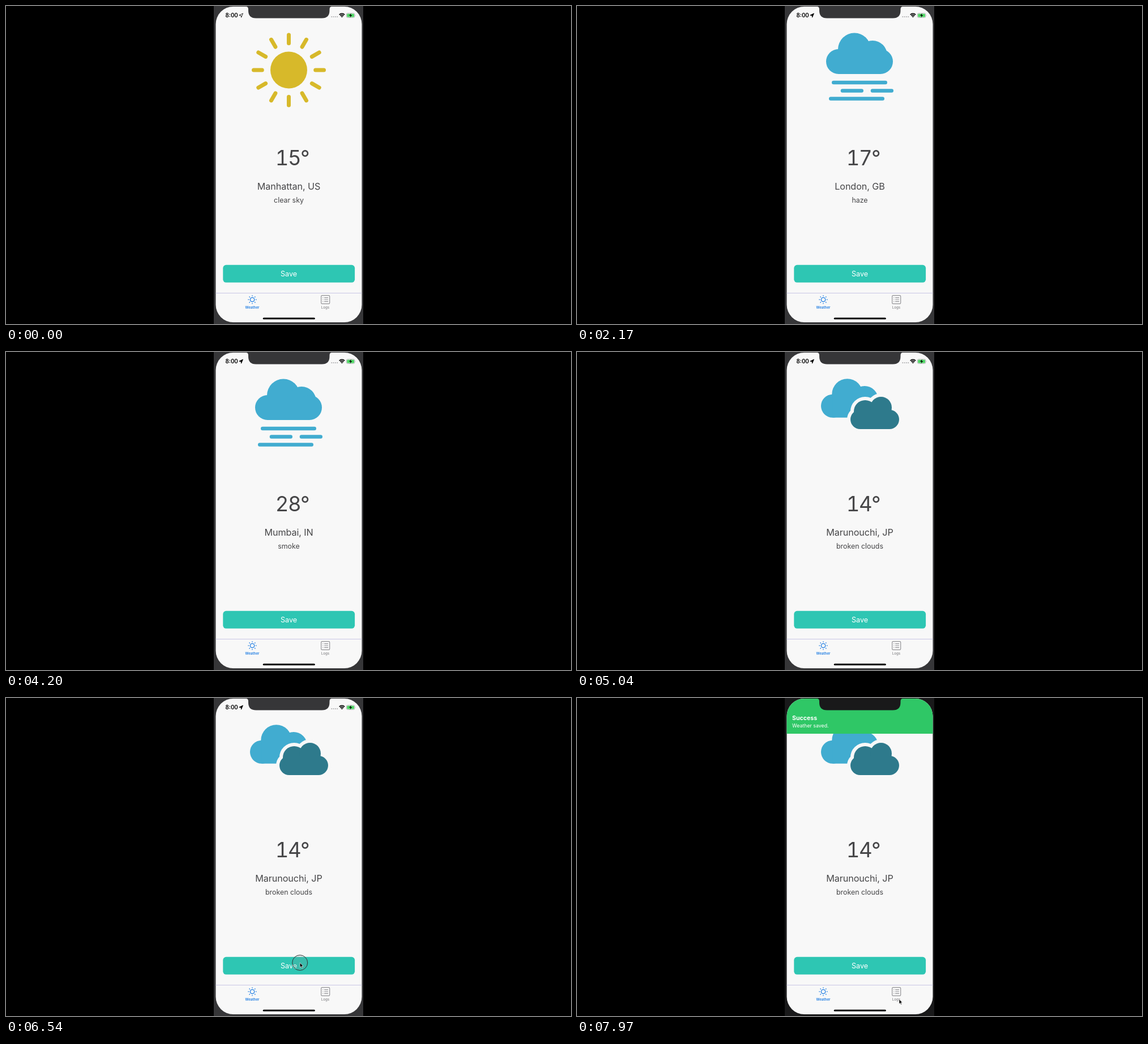
Animation of 998 by 561 pixels, one loop 8000 ms. Source, as an HTML page:

```html
<!DOCTYPE html>
<html lang="en">
<head>
<meta charset="utf-8">
<title>Weather</title>
<style>
  html, body { margin: 0; width: 100%; height: 100%; overflow: hidden; background: #000; }
  svg { display: block; width: 100%; height: 100%; font-family: Inter, "Open Sans", sans-serif; }
  .center { text-anchor: middle; }
  .ink { fill: #464648; }
  #temperature { font-size: 36.5px; letter-spacing: -1.6px; text-anchor: end; font-feature-settings: "tnum"; }
  #city { font-size: 16.2px; letter-spacing: -.1px; }
  #sky { font-size: 12.4px; }
  .tab { font-size: 6.1px; font-weight: 600; text-anchor: middle; }
  .round { fill: none; stroke-linecap: round; }
</style>
</head>
<body>
<svg viewBox="0 0 998 561">
  <defs>
    <clipPath id="screen"><rect x="370.5" y="1" width="258" height="557" rx="31"/></clipPath>
    <g id="bigCloud">
      <circle cx="462" cy="98" r="22"/><circle cx="490" cy="76.5" r="29"/>
      <circle cx="522" cy="87" r="26"/><circle cx="536" cy="98" r="22"/>
      <rect x="462" y="80" width="74" height="40"/>
    </g>
    <g id="darkCloud">
      <circle cx="500" cy="119" r="17"/><circle cx="509" cy="105" r="20"/>
      <circle cx="537" cy="98" r="19"/><circle cx="552" cy="119" r="17"/>
      <rect x="500" y="105" width="52" height="31"/>
    </g>
  </defs>

  <rect id="bezel" x="367" width="264" height="561"/>
  <g clip-path="url(#screen)">
    <rect x="370" width="260" height="560" fill="#f8f8f8"/>

    <g id="sun" fill="#d7b92a" stroke="#d7b92a">
      <circle cx="499.5" cy="113" r="32.5" stroke="none"/>
      <g id="sunRays" class="round" stroke-width="7"/>
    </g>
    <g id="haze" fill="#41acd0">
      <use href="#bigCloud"/>
      <path class="round" stroke="#41acd0" stroke-width="6.6"
        d="M453.3 135H544.7M469 149.5H502.7M522 149.5H555.7M448.3 163.5H539.7"/>
    </g>
    <g id="clouds">
      <g fill="#41acd0">
        <circle cx="451.5" cy="95.2" r="20.5"/><circle cx="477.5" cy="74.5" r="27.2"/>
        <circle cx="508" cy="84" r="24"/><rect x="451.5" y="78" width="60" height="37.7"/>
      </g>
      <use href="#darkCloud" fill="#f8f8f8" stroke="#f8f8f8" stroke-width="12"/>
      <use href="#darkCloud" fill="#2e7a8c"/>
    </g>

    <text id="temperature" class="ink" x="535" y="280.5"></text>
    <text id="city" class="ink center" x="499.5" y="324"></text>
    <text id="sky" class="ink center" x="499.5" y="347.3"></text>

    <rect x="383.3" y="456.8" width="232.8" height="31" rx="5.5" fill="#2ec6b3"/>
    <text class="center" x="499.5" y="477" font-size="12.6" fill="#fff">Save</text>

    <rect x="370" y="506" width="260" height="1" fill="#c9c7e6"/>
    <g fill="#1c7be2">
      <circle class="round" cx="435" cy="518" r="3.7" stroke="#1c7be2" stroke-width="1.3"/>
      <g id="tabRays" class="round" stroke="#1c7be2" stroke-width="1.4"/>
      <text class="tab" x="435" y="534.3">Weather</text>
    </g>
    <g fill="#949497">
      <rect class="round" x="556.7" y="510.6" width="15" height="14.8" rx="1.7" stroke="#949497" stroke-width="1.2"/>
      <path class="round" stroke="#949497" stroke-width="1.2"
        d="M559.8 514.6h.1M562.6 514.6h6M559.8 518h.1M562.6 518h6M559.8 521.4h.1M562.6 521.4h6"/>
      <text class="tab" x="564" y="534.3">Logs</text>
    </g>
    <rect x="453.8" y="549.7" width="92" height="3" rx="1.5"/>

    <text x="387.5" y="20.2" font-size="9.8" font-weight="600">8:00</text>
    <path id="arrow" d="M418.5 13L411.8 16.3L415.1 16.9L415.6 20.2Z" stroke="#000" stroke-width=".8" stroke-linejoin="round"/>
    <path class="round" stroke="#b0b0b3" stroke-width="2.2" d="M575.3 19h.01M578.6 19h.01M581.9 19h.01M585.2 19h.01"/>
    <path class="round" stroke="#000" stroke-width="1.7" style="stroke-linecap:butt"
      d="M588.6 15.4Q593.4 11.2 598.2 15.4M590.4 17.3Q593.4 14.8 596.4 17.3"/>
    <path d="M591.7 18.5Q593.4 17.2 595.1 18.5L593.4 20.3Z"/>
    <rect x="601.3" y="12.8" width="14.6" height="7.6" rx="2.2" fill="none" stroke="#9a9a9d" stroke-width=".7"/>
    <rect x="602.3" y="13.8" width="12.6" height="5.6" rx="1.2" fill="#4fd765"/>
    <path d="M616.8 15.2v2.8q1.2-1.4 0-2.8" fill="#9a9a9d"/>
    <path d="M609.7 12.8L606 17.1H608.4L607.5 20.4L611.3 16.1H608.9Z"/>

    <g id="banner" fill="#fff">
      <rect x="370" y="-40" width="260" height="103" fill="#2fc766"/>
      <text x="380" y="38.8" font-size="10.6" font-weight="700">Success</text>
      <text x="380" y="52" font-size="8.8">Weather saved.</text>
    </g>
  </g>
  <path id="notch" d="M424 0V1Q428 1 428 6V8Q428 21.5 441.5 21.5H558Q571.5 21.5 571.5 8V6Q571.5 1 575.5 1V0Z"/>

  <g id="cursor">
    <circle id="touch" r="13.5" fill="#808080" fill-opacity=".15" stroke="#303434"/>
    <path d="M0 0V8.2L1.9 6.5L3.2 9.4L4.5 8.8L3.2 6H5.8Z" stroke="#fff" stroke-width=".6"/>
  </g>
</svg>
<script>
const LOOP = 8000;
const reports = [
  { from: 0, icon: "sun", temperature: "15°", city: "Manhattan, US", sky: "clear sky" },
  { from: 550, icon: "haze", temperature: "17°", city: "London, GB", sky: "haze" },
  { from: 2200, icon: "sun", temperature: "19°", city: "Johannesburg, ZA", sky: "clear sky" },
  { from: 3640, icon: "haze", temperature: "28°", city: "Mumbai, IN", sky: "smoke" },
  { from: 5000, icon: "clouds", temperature: "14°", city: "Marunouchi, JP", sky: "broken clouds" }
];
const el = id => document.getElementById(id);
const show = (id, on) => { el(id).style.display = on ? "" : "none"; };
const progress = (t, start, end) => Math.min(1, Math.max(0, (t - start) / (end - start)));
const easeInOut = p => p * p * (3 - 2 * p);
const easeOut = p => 1 - (1 - p) ** 3;
const mix = (a, b, p) => a + (b - a) * p;

function addRays(id, cx, cy, count, inner, outer) {
  el(id).innerHTML = Array.from({ length: count }, (_, i) =>
    `<path d="M${cx + inner} ${cy}H${cx + outer}" transform="rotate(${i * 360 / count} ${cx} ${cy})"/>`).join("");
}
addRays("sunRays", 499.5, 113, 12, 47.2, 62);
addRays("tabRays", 435, 518, 8, 6.5, 7);

function render(t) {
  const report = reports.findLast(r => r.from <= t);
  for (const icon of ["sun", "haze", "clouds"]) show(icon, icon === report.icon);
  for (const field of ["temperature", "city", "sky"]) el(field).textContent = report[field];
  el("arrow").setAttribute("fill", t < reports[1].from ? "none" : "#000");

  const frameColor = t < 6600 ? "#363638" : "#19191a";
  el("bezel").setAttribute("fill", frameColor);
  el("notch").setAttribute("fill", frameColor);

  const slide = easeOut(progress(t, 6720, 7120));
  el("banner").setAttribute("transform", `translate(0 ${-64 * (1 - slide)})`);

  // The pointer comes down to Save, then goes on to the Logs tab.
  const toSave = easeInOut(progress(t, 5950, 6450));
  const toLogs = easeInOut(progress(t, 6900, 7600));
  const x = mix(mix(545, 519.2, toSave), 569, toLogs);
  const y = mix(mix(-12, 467, toSave), 531.5, toLogs);
  el("cursor").setAttribute("transform", `translate(${x} ${y})`);
  show("touch", t >= 6480 && t < 6620);
}

function tick() {
  render(performance.now() % LOOP);
  requestAnimationFrame(tick);
}
tick();
</script>
</body>
</html>
```
